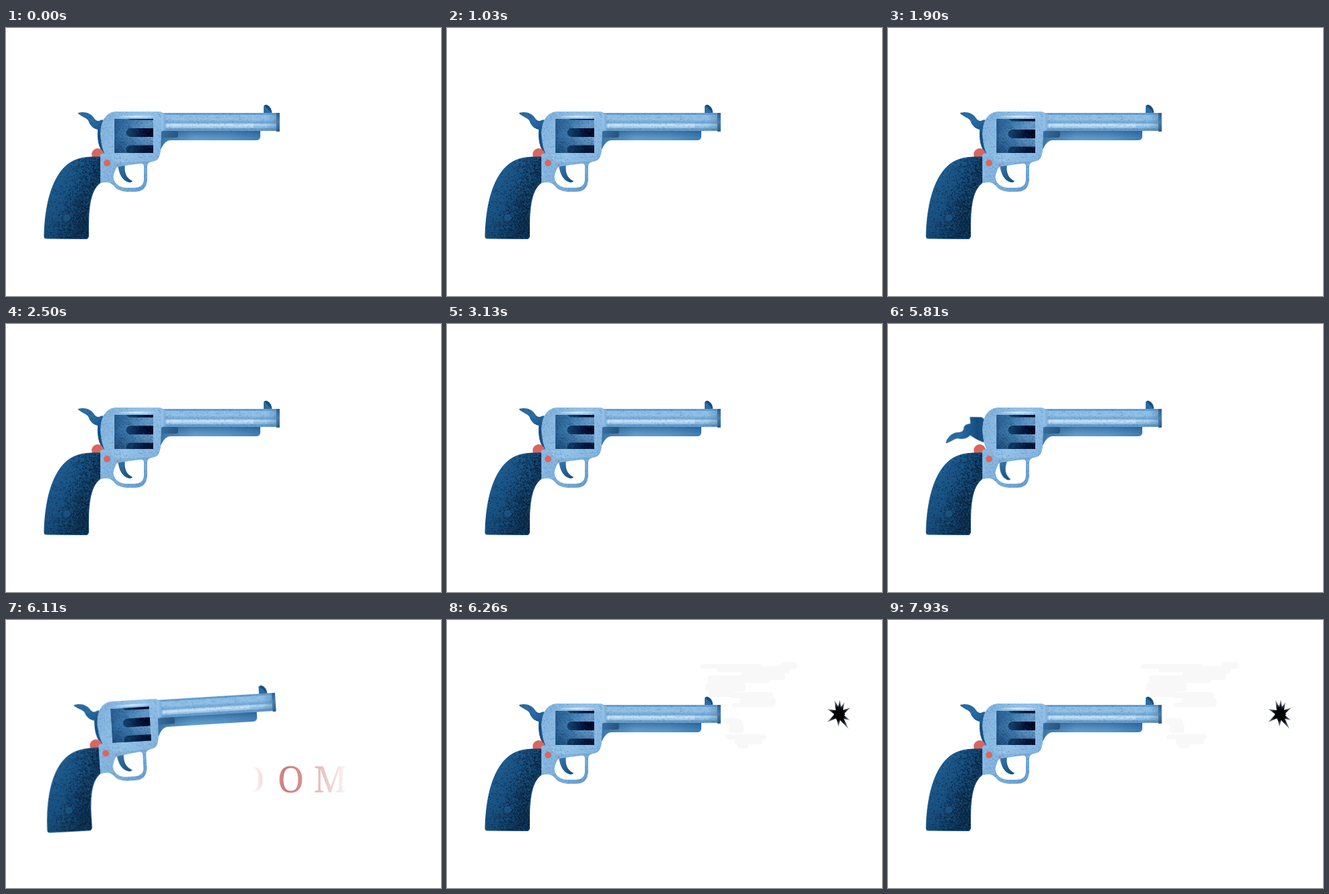
Write an HTML page with a canvas that moves like this. It is 650 px wide and 401 px high and loops after 8000 ms.

```html
<!DOCTYPE html>
<html lang="en">
<head>
<meta charset="utf-8">
<title>Revolver</title>
<style>
html, body { margin: 0; width: 100%; height: 100%; overflow: hidden; background: #fff; }
canvas { display: block; }
</style>
</head>
<body>
<canvas id="stage" width="650" height="401"></canvas>
<script>
const W = 650, H = 401, LOOP = 8000;
const ctx = document.getElementById('stage').getContext('2d');

const clamp = u => Math.max(0, Math.min(1, u));
const part = (t, a, b) => clamp((t - a) / (b - a));
const smooth = u => u * u * (3 - 2 * u);

function random(seed) {
  return () => {
    seed = (seed * 1664525 + 1013904223) >>> 0;
    return seed / 4294967296;
  };
}

function layer(draw) {
  const c = document.createElement('canvas');
  c.width = W; c.height = H;
  draw(c.getContext('2d'));
  return c;
}

function blend(g, x0, y0, x1, y1, ...colors) {
  const grad = g.createLinearGradient(x0, y0, x1, y1);
  colors.forEach((c, i) => grad.addColorStop(i / (colors.length - 1), c));
  return grad;
}

function fill(g, path, style) {
  g.fillStyle = style;
  g.fill(path, 'evenodd');
}

function inside(g, path, draw) {
  g.save();
  g.clip(path, 'evenodd');
  draw();
  g.restore();
}

// Random grains; weight(x, y) gives the chance of each being kept.
function grain(g, seed, n, [x, y, w, h], color, weight = () => 1) {
  const r = random(seed);
  g.fillStyle = color;
  for (let i = 0; i < n; i++) {
    const u = r(), v = r(), keep = r(), s = 0.6 + r() * 0.8;
    if (keep < weight(u, v)) g.fillRect(x + u * w, y + v * h, s, s);
  }
}

function scratches(g, seed, n, [x, y, w, h], color) {
  const r = random(seed);
  g.strokeStyle = color;
  g.lineWidth = 0.6;
  for (let i = 0; i < n; i++) {
    const a = x + r() * w, b = y + r() * h;
    g.beginPath();
    g.moveTo(a, b);
    g.lineTo(a + (r() - 0.5) * 18, b + (r() - 0.5) * 10);
    g.stroke();
  }
}

function dot(g, x, y, r, color) {
  g.fillStyle = color;
  g.beginPath();
  g.arc(x, y, r, 0, 7);
  g.fill();
}

const hammerPath = new Path2D('M108,127 C118,124 127,128 131,134 C134,139 138,140 141,138 C145,136 148,138 152,143 L160,137 L169,152 L166,185 L146,188 C138,180 136,165 137,152 C132,151 126,147 124,141 C122,134 114,134 108,128 Z');
const triggerPath = new Path2D('M167,203 L178,203 C176,216 180,225 189,229 Q188,231 184,231 C174,229 168,218 167,203 Z');
const gripPath = new Path2D('M141,193 C114,192 98,196 84,212 C66,234 58,270 57,312 Q57,315 60,315 L120,315.5 Q123,315.5 123.500,311 C123,275 124,243 142,231 Z');
const framePath = new Path2D('M166,125 L228,125 Q232,125 234,127 L238,128 L238,153 L232,155 L231,181 Q230,197 222,199 Q211,200 211,207 L211,227 Q210,245 192,245 L180,245 Q166,244 160,235 Q154,229 141,232 L141,189 L147,187 C142,177 141,163 142,151 C144,136 151,125 166,125 Z M163,214 Q164,208 170,207 L199,203 Q206,202 206,207 L206,226 Q206,239 191,239 L180,239 Q169,239 163,231 Q158,224 163,214 Z');
const dPath = new Path2D('M166,125 L228,125 Q232,125 232,130 L231,181 Q230,197 221,199 L172,201 C151,200 142,180 141,158 C142,138 149,126 166,125 Z');
const barrelPath = new Path2D('M232,127 L409,127 L409,154 L232,154 Z');
const rodPath = new Path2D('M232,153 L380,153 L380,163 Q379,168 374,168 L245,168 Q236,169 230,185 Z');
const sightPath = new Path2D('M385,128 L385,118 Q386,114 390,115 Q397,118 397.500,128 Z');

const hammer = layer(g => {
  fill(g, hammerPath, blend(g, 110, 125, 148, 185, '#2d6ca3', '#2a6ba3', '#164f80', '#1b5689'));
  inside(g, hammerPath, () => grain(g, 3, 260, [105, 122, 60, 66], 'rgba(8,38,70,.3)'));
});

const trigger = layer(g => fill(g, triggerPath, blend(g, 167, 205, 187, 231, '#3777aa', '#174e7d')));

const body = layer(g => {
  dot(g, 137, 189, 9, '#d9665f');

  fill(g, gripPath, blend(g, 62, 225, 130, 275, '#205f94', '#174f7f', '#123d63'));
  inside(g, gripPath, () => {
    grain(g, 11, 7500, [56, 192, 88, 125], 'rgba(8,24,42,.62)',
      (u, v) => clamp(0.08 + 0.9 * smooth(part(u + v * 0.45, 0.42, 1.05))));
    grain(g, 12, 700, [56, 192, 88, 125], 'rgba(55,115,165,.35)');
    dot(g, 91, 284, 5, 'rgba(33,91,138,.65)');
  });
  g.lineWidth = 1;
  g.strokeStyle = 'rgba(20,82,130,.8)';
  g.stroke(gripPath);

  fill(g, rodPath, blend(g, 232, 0, 380, 0, '#3a76aa', '#65a0d0', '#5c99cc', '#3f7fb6'));
  inside(g, rodPath, () => {
    g.fillStyle = blend(g, 0, 153, 0, 168, 'rgba(10,55,98,.45)', 'rgba(40,100,155,0)');
    g.fillRect(230, 153, 152, 15);
    g.fillStyle = blend(g, 232, 0, 257, 0, '#376c9c', '#255580');
    g.beginPath();
    g.roundRect(228, 154, 29, 10, 3);
    g.fill();
  });

  fill(g, sightPath, '#174d7b');
  inside(g, sightPath, () => {
    g.fillStyle = '#2c6ca2';
    g.beginPath();
    g.moveTo(385, 115); g.lineTo(398, 128); g.lineTo(385, 128);
    g.fill();
  });

  fill(g, barrelPath, '#85b6e0');
  const bands = [
    [127, 3, '#689fce'], [130, 8, '#8fc0e8'], [138, 2, '#82b3dc'],
    [140, 3, '#76a9d5'], [143, 4, '#a9d0ee'], [147, 3, '#8abae2'], [150, 4, '#669bca']
  ];
  for (const [y, h, c] of bands) {
    g.fillStyle = c;
    g.fillRect(232, y, 177, h);
  }
  g.fillStyle = blend(g, 0, 141, 0, 151, 'rgba(225,242,255,0)', 'rgba(225,242,255,.55)', 'rgba(225,242,255,0)');
  g.fillRect(240, 141, 130, 10);
  inside(g, barrelPath, () => {
    scratches(g, 21, 65, [240, 128, 160, 25], 'rgba(50,100,150,.26)');
    grain(g, 22, 500, [236, 127, 170, 27], 'rgba(40,90,140,.22)');
  });
  g.fillStyle = blend(g, 388, 0, 405, 0, 'rgba(80,130,175,0)', 'rgba(70,120,165,.45)');
  g.fillRect(388, 127, 17, 27);
  g.fillStyle = blend(g, 0, 127, 0, 154, '#2d618f', '#4b7fae', '#315f89');
  g.fillRect(404, 127, 5, 28);

  fill(g, framePath, blend(g, 145, 190, 208, 245, '#8bbbe4', '#7fb1dd', '#659ccd'));
  fill(g, dPath, blend(g, 143, 145, 233, 192, '#83b4de', '#94c3e9', '#82b3df'));
  inside(g, framePath, () => {
    grain(g, 31, 1500, [140, 124, 98, 122], 'rgba(38,95,150,.24)');
    grain(g, 32, 600, [140, 124, 98, 122], 'rgba(215,236,252,.3)');
    scratches(g, 33, 38, [142, 126, 86, 78], 'rgba(50,105,155,.22)');
  });
  g.fillStyle = blend(g, 165, 0, 222, 0, 'rgba(230,244,255,0)', 'rgba(230,244,255,.75)', 'rgba(230,244,255,.2)');
  g.fillRect(165, 131, 56, 3);
  g.fillStyle = blend(g, 231, 0, 239, 0, '#9dc9ec', '#76a9d5');
  g.fillRect(232, 128, 6, 25);

  dot(g, 151, 202, 5, '#d9665f');
  dot(g, 167, 205, 1.7, 'rgba(217,102,95,.65)');
});

const cylinderNoise = layer(g => {
  grain(g, 41, 520, [162, 136, 58, 51], 'rgba(8,35,70,.28)');
  grain(g, 42, 160, [162, 136, 58, 51], 'rgba(140,190,230,.22)');
});

const hole = layer(g => {
  const spikes = [[568, 153], [568, 133], [579, 120], [587, 119], [594, 123], [603, 131], [602, 150], [600, 163], [585, 160]];
  g.translate(585.5, 141);
  for (const [x, y] of spikes) {
    const dx = x - 585.5, dy = y - 141, d = Math.hypot(dx, dy);
    g.fillStyle = blend(g, 0, 0, dx, dy, '#000', '#11141c', '#9ba3b3');
    g.beginPath();
    g.moveTo(-dy / d * 5, dx / d * 5);
    g.lineTo(dx, dy);
    g.lineTo(dy / d * 4, -dx / d * 4);
    g.fill();
  }
  g.fillStyle = '#020205';
  g.beginPath();
  for (let i = 0; i < 14; i++) {
    const a = i / 14 * Math.PI * 2, r = i % 2 ? 8 : 10.5;
    g.lineTo(Math.cos(a) * r * 0.9, Math.sin(a) * r);
  }
  g.fill();
});

const smoke = layer(g => {
  const puffs = [
    [378, 66, 92, 7], [404, 68, 60, 10], [498, 63, 25, 10], [458, 69, 54, 11],
    [440, 77, 65, 13], [390, 83, 93, 11], [386, 94, 60, 13], [391, 105, 38, 10],
    [424, 108, 63, 9], [438, 116, 53, 14], [426, 124, 30, 7], [414, 147, 26, 10],
    [421, 155, 22, 14], [416, 171, 61, 8], [430, 178, 42, 8], [434, 184, 16, 8]
  ];
  g.fillStyle = '#f8f8f8';
  for (const [x, y, w, h] of puffs) {
    g.beginPath();
    g.roundRect(x, y, w, h, 4);
    g.fill();
  }
});

// Cylinder travel in flutes.
function spin(t) {
  const u = part(t, 1600, 2380);
  return smooth(part(t, 730, 1030)) + 1.5 * (u + smooth(u)) + 2.08 * smooth(part(t, 2410, 3130));
}

function drawCylinder(t) {
  const pitch = 25.5, shift = (spin(t) % 1) * pitch;
  ctx.save();
  ctx.beginPath();
  ctx.rect(162, 136, 58, 51);
  ctx.clip();
  ctx.fillStyle = blend(ctx, 162, 0, 220, 0, '#2b6296', '#3d7bb0', '#5a96c9', '#71a9d8');
  ctx.fillRect(162, 136, 58, 51);
  for (let y = 99 + shift; y < 190; y += pitch) {
    ctx.fillStyle = blend(ctx, 179, 0, 220, 0, '#154770', '#0b2e55', '#020b30', '#01051f');
    ctx.beginPath();
    ctx.roundRect(179.5, y, 50, 13, 6.5);
    ctx.fill();
  }
  ctx.fillStyle = blend(ctx, 0, 136, 0, 187, 'rgba(8,40,75,.12)', 'rgba(8,40,75,0)', 'rgba(8,40,75,.42)');
  ctx.fillRect(162, 136, 58, 51);
  ctx.drawImage(cylinderNoise, 0, 0);
  ctx.restore();
}

function drawTurned(img, x, y, deg) {
  ctx.save();
  ctx.translate(x, y);
  ctx.rotate(deg * Math.PI / 180);
  ctx.drawImage(img, -x, -y);
  ctx.restore();
}

function drawGun(t) {
  const kick = 1.53 * smooth(part(t, 5850, 6020)) * (1 - smooth(part(t, 6020, 6260)));
  const cock = smooth(part(t, 4730, 4940)) * (1 - part(t, 5825, 5885));
  const pull = part(t, 5790, 5810) * (1 - part(t, 5870, 5960));
  ctx.save();
  ctx.translate(-13.6 * kick, 7 * kick);
  ctx.rotate(-3.4 * kick * Math.PI / 180);
  drawTurned(hammer, 143, 172, -58 * cock);
  drawTurned(trigger, 172, 205, 13 * pull);
  ctx.drawImage(body, 0, 0);
  drawCylinder(t);
  ctx.restore();
}

function drawBang(t) {
  if (t < 5930 || t >= 6230) return;
  const power = part(t, 5930, 6020) * (1 - part(t, 6140, 6230));
  const x = 437 + (t - 6110) * 0.4;
  const tone = a => `rgba(190,82,82,${a * power})`;
  ctx.fillStyle = blend(ctx, x - 70, 0, x + 74, 0, tone(0), tone(0.3), tone(0.78), tone(0.65), tone(0.4), tone(0.25), tone(0));
  ctx.font = '54px "Noto Serif", serif';
  ctx.textAlign = 'center';
  [...'BOOM'].forEach((c, i) => ctx.fillText(c, 307 + i * 59.3, 258));
}

function frame(now) {
  const t = now % LOOP;
  ctx.fillStyle = '#fff';
  ctx.fillRect(0, 0, W, H);
  ctx.globalAlpha = part(t, 6140, 6260);
  ctx.drawImage(smoke, 0, 0);
  ctx.globalAlpha = 1;
  if (t >= 6170) ctx.drawImage(hole, 0, 0);
  drawBang(t);
  drawGun(t);
  requestAnimationFrame(frame);
}
requestAnimationFrame(frame);
</script>
</body>
</html>
```
